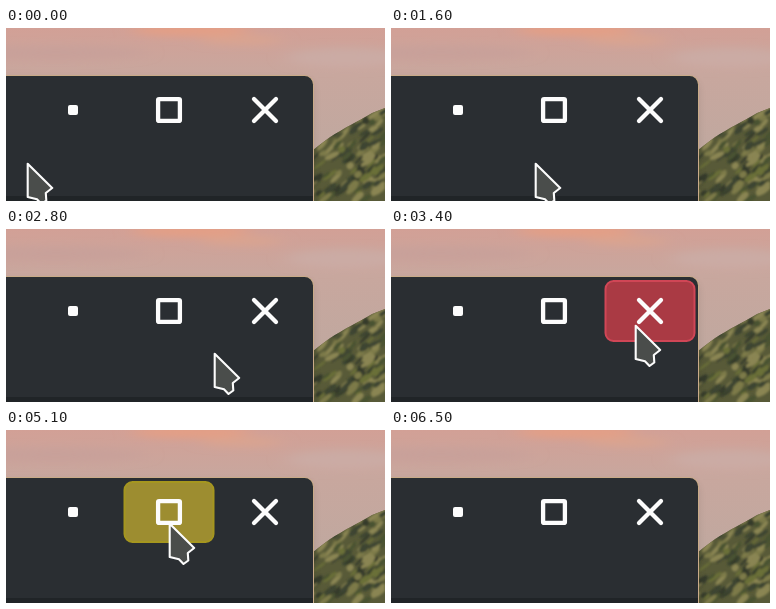
Animation of 379x173 px, one loop 7100 ms. Source, as an HTML page:

```html
<!DOCTYPE html>
<html lang="en">
<head>
<meta charset="utf-8">
<title>Window buttons</title>
<style>
  html, body { margin: 0; width: 100%; height: 100%; overflow: hidden; background: #c3a79f; }
  svg { display: block; width: 100vw; height: 100vh; }
  .btn { --fill: #9d8d30; --edge: #a5961f; opacity: 0; }
  .btn rect { width: 89px; height: 60px; rx: 8px; stroke-width: 2; stroke: var(--edge); fill: var(--fill); }
  #close { --fill: #aa3a44; --edge: #d04656; }
</style>
</head>
<body>
<svg viewBox="0 0 379 173" preserveAspectRatio="none">
  <defs>
    <linearGradient id="sky" x1="0" y1="0" x2="0" y2="1">
      <stop offset="0" stop-color="#d2a096"/>
      <stop offset=".27" stop-color="#c8a79e"/>
      <stop offset=".7" stop-color="#c0a89f"/>
    </linearGradient>
    <filter id="soft" x="-50%" y="-100%" width="200%" height="300%"><feGaussianBlur stdDeviation="9 4"/></filter>
    <filter id="blur"><feGaussianBlur stdDeviation=".9"/></filter>
    <filter id="shade" x="-10%" y="-20%" width="120%" height="140%"><feGaussianBlur stdDeviation="4"/></filter>
    <clipPath id="hill">
      <path d="M379 80L366 85 354 92 339 100 324 109 307 122V173H379Z"/>
    </clipPath>
  </defs>

  <rect width="379" height="173" fill="url(#sky)"/>
  <g filter="url(#soft)">
    <ellipse cx="185" cy="2" rx="60" ry="6" fill="#e59f84"/>
    <ellipse cx="235" cy="12" rx="42" ry="4" fill="#dca48e"/>
    <ellipse cx="50" cy="25" rx="90" ry="7" fill="#c8a09a"/>
    <ellipse cx="340" cy="30" rx="60" ry="10" fill="#cbaba4"/>
  </g>

  <g clip-path="url(#hill)">
    <rect x="307" y="70" width="72" height="103" fill="#585a38"/>
    <g id="scrub" filter="url(#blur)"></g>
  </g>

  <rect x="-30" y="52" width="337" height="160" rx="9" filter="url(#shade)" opacity=".12"/>
  <rect x="-30" y="47" width="338" height="160" rx="9.5" fill="#c9ab88"/>
  <rect x="-30" y="48" width="337" height="160" rx="8.5" fill="#2a2e32"/>
  <rect y="168" width="307" height="5" fill="#202427"/>

  <g class="btn" id="min"><rect x="22.5" y="52"/></g>
  <g class="btn" id="max"><rect x="118.5" y="52"/></g>
  <g class="btn" id="close"><rect x="214.5" y="52"/></g>

  <g fill="none" stroke="#fcfcfc" stroke-width="4.3">
    <rect x="62" y="77" width="10" height="10" rx="2" fill="#fcfcfc" stroke="none"/>
    <rect x="152.1" y="71.1" width="21.8" height="21.8" rx="1"/>
    <path d="M248 71L270 93M270 71L248 93" stroke-linecap="round"/>
  </g>

  <path id="cursor" d="M.7-.2V33L10 35.3 14.5 40 19.3 36.5 18.8 29 25.2 24Z"
        fill="#4a4d4b" stroke="#fcfcfc" stroke-width="2.1" stroke-linejoin="round"/>
</svg>
<script>
  const LOOP = 7100, STEP = 100;
  const $ = id => document.getElementById(id);
  const clamp = v => Math.max(0, Math.min(1, v));

  // pointer moves: start ms, end ms, where the tip arrives
  const home = [21, 136];
  const moves = [
    [200, 700, 60, 94],
    [900, 1000, 56, 111],
    [1000, 1600, 144, 136],
    [1600, 2000, 157, 95],
    [2200, 2400, 174, 117],
    [2700, 2800, 208, 125],
    [2800, 3500, 253, 90],
    [3600, 4100, 206, 128],
    [4100, 4700, 163, 94],
    [5100, 6500, -40, 190]
  ];

  // highlights: button, enter ms, leave ms
  const visits = [
    ['min', 400, 1065],
    ['max', 1800, 2800],
    ['close', 3000, 3950],
    ['max', 4400, 5250]
  ];

  function tip(t) {
    let [x, y] = home;
    for (const [from, to, toX, toY] of moves) {
      const p = clamp((t - from) / (to - from)) ** 1.4;
      x += (toX - x) * p;
      y += (toY - y) * p;
    }
    return [Math.round(x), Math.round(y)];
  }

  function draw(ms) {
    const t = Math.floor(ms % LOOP / STEP) * STEP;
    $('cursor').setAttribute('transform', `translate(${tip(t)})`);

    const glow = { min: 0, max: 0, close: 0 };
    for (const [id, enter, leave] of visits) {
      glow[id] += Math.min(clamp((t - enter) / 200), clamp((leave - t) / 100));
    }
    for (const id in glow) {
      // the outline fades later than the fill
      $(id).style.opacity = Math.min(1, glow[id] * 1.5);
      $(id).firstChild.style.fillOpacity = glow[id];
    }
  }

  // tufts of grass and rock lying along the slope
  function plant() {
    let seed = 7;
    const rnd = () => (seed = seed * 16807 % 2147483647) / 2147483647;
    const tones = ['#7d7a48', '#6b7038', '#3d4530', '#4a5230', '#8a8552', '#343a2c'];
    let tufts = '';
    for (let i = 0; i < 150; i++) {
      const x = 305 + rnd() * 76, y = 78 + rnd() * 95;
      const rx = 3 + rnd() * 6, ry = 1 + rnd() * 2.5;
      const tone = tones[Math.floor(rnd() * tones.length)];
      tufts += `<ellipse rx="${rx}" ry="${ry}" fill="${tone}"
        transform="translate(${x} ${y}) rotate(${-25 - rnd() * 30})"/>`;
    }
    $('scrub').innerHTML = tufts;
  }

  plant();
  const start = performance.now();
  function tick() {
    draw(performance.now() - start);
    requestAnimationFrame(tick);
  }
  tick();
</script>
</body>
</html>
```
